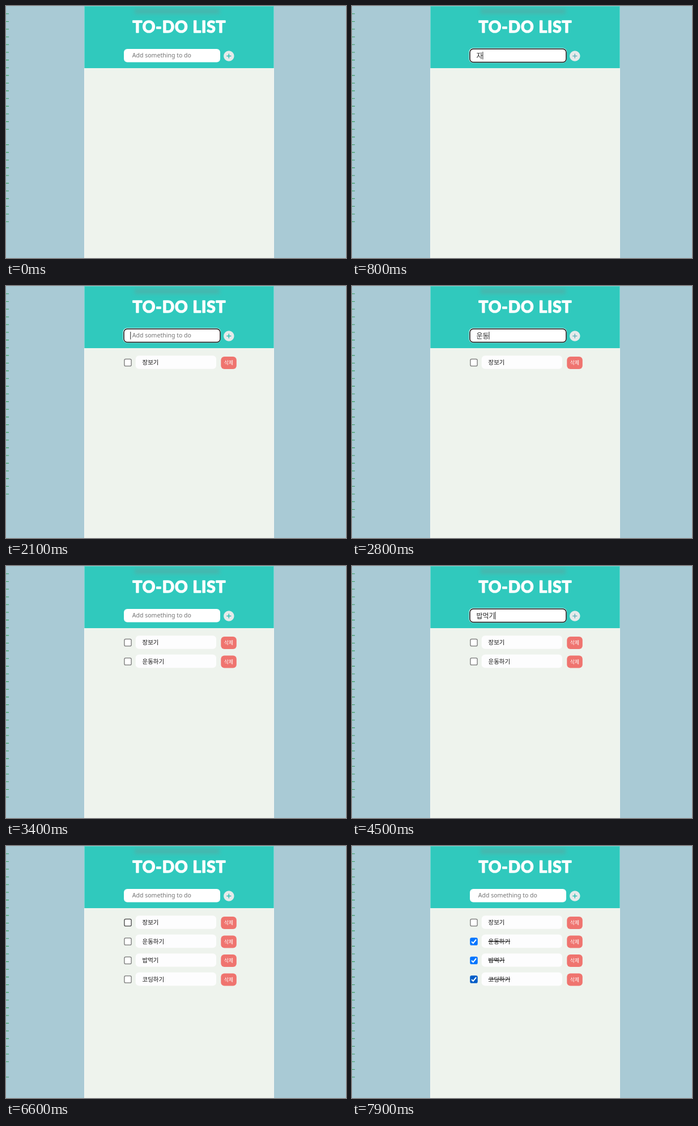
Recreate the animation shown at these times as an HTML page. Size 600 by 446 pixels, loop 8 s.

```html
<!DOCTYPE html>
<html lang="ko">
<head>
<meta charset="utf-8">
<style>
  html, body { margin: 0; width: 100%; height: 100%; overflow: hidden; background: #a9cad5; }
  svg { display: block; width: 100%; height: 100%; }
  text { font-family: "Noto Sans CJK KR", "Noto Sans CJK", "Noto Sans CJK JP", sans-serif; white-space: pre; }
  .title { font: 700 28px Lato, sans-serif; letter-spacing: 1px; fill: #fff; stroke: #fff; stroke-width: 1.6; stroke-linejoin: round; }
  .hint { font: 10.55px "Noto Sans", sans-serif; fill: #757575; }
  .typed { font-size: 12px; font-weight: 300; fill: #222; }
  .label { font-size: 10.5px; font-weight: 500; fill: #111; }
  .done .label { text-decoration: line-through; }
  .delete { font-size: 8.7px; fill: #fff; }
  .box { fill: #fff; stroke: #767676; stroke-width: 1.3; }
  .hover .box { stroke: #444; }
  .done .box { fill: #0075ff; stroke: #0075ff; }
  .done.hover .box { fill: #005cc8; stroke: #005cc8; }
  .tick { fill: none; stroke: #fff; stroke-width: 2; visibility: hidden; }
  .done .tick { visibility: visible; }
</style>
</head>
<body>
<svg viewBox="0 0 600 446">
  <defs><filter id="blur" x="-20%" y="-80%" width="140%" height="260%"><feGaussianBlur stdDeviation="3"/></filter></defs>
  <path id="marks" stroke="#3aa060" stroke-width="1.1"/>
  <rect x="138" width="335" height="446" fill="#eef3ed"/>
  <rect x="138" width="335" height="110" fill="#30c9bd"/>
  <path d="M138.5 446V.5H472.5V446" fill="none" stroke="#fff" stroke-opacity=".3"/>
  <rect x="227" y="5" width="150" height="9" fill="#4fb0a8" opacity=".75" filter="url(#blur)"/>
  <text class="title" x="223.5" y="47">TO-DO LIST</text>
  <rect id="halo" x="206.5" y="74.5" width="172.5" height="26" rx="7" fill="#fff"/>
  <rect id="field" x="208" y="76" width="170" height="23.5" rx="6" fill="#fff" stroke="#111"/>
  <text id="hint" class="hint" x="222.7" y="90.7">Add something to do</text>
  <text id="typed" class="typed" x="219.5" y="92.5"></text>
  <rect id="caret" y="81" width="1" height="13.5" fill="#222"/>
  <circle cx="393.3" cy="88.5" r="9.3" fill="#e6eaea"/>
  <path id="plus" d="M389.3 88.5h8M393.3 84.5v8" stroke-width="1.4"/>
  <g id="rows"></g>
</svg>
<script>
const $ = id => document.getElementById(id);
const LOOP = 8000;

// [label, time added, time checked]
const items = [
  ['장보기', 1700, Infinity],
  ['운동하기', 3300, 6900],
  ['밥먹기', 4600, 7300],
  ['코딩하기', 6100, 7700]
];

// [focus time, first key time, input states]; a state lasts 100 ms
const sessions = [
  [300, 600, 'ㅈ 자 자 장 장ㅂ 장보 장복 장보기'],
  [1900, 2300, 'ㅇ 우 운 운ㄷ 운도 운동 운동하 운동학 운동하기'],
  [3600, 3900, 'ㅂ 바 밥 밥머 밥먹 밥먹기'],
  [4900, 5100, 'ㅋ 코 코디 코딩 코딩ㅎ 코딩하 코딩학 코딩하기']
];

// Margin marks: [start time, count, gaps]
const margins = [
  [0, 28, [16]], [500, 28, []], [1000, 32, []], [1900, 27, []],
  [2800, 30, []], [4700, 24, [3, 5, 6, 15, 19, 21]],
  [5500, 32, []], [6400, 30, [28]], [7300, 30, []]
];

$('rows').innerHTML = items.map(([label], i) => `
  <g transform="translate(0 ${i * 33.5})">
    <rect class="box" x="208.9" y="129.4" width="12.2" height="12.2" rx="2.2"/>
    <path class="tick" d="M211 135.8l2.8 2.8 5.3-6.6"/>
    <rect x="228.7" y="123.3" width="142.3" height="23.5" rx="6" fill="#fdfdfe"/>
    <text class="label" x="240.5" y="139.2">${label}</text>
    <rect x="379.3" y="125" width="27.5" height="22" rx="6" fill="#ef746f"/>
    <text class="delete" x="393" y="139.4" text-anchor="middle">삭제</text>
  </g>`).join('');
const rows = [...$('rows').children];

const show = (el, on) => el.setAttribute('visibility', on ? 'visible' : 'hidden');

function drawMarks(t) {
  const [, count, gaps] = margins.findLast(m => m[0] <= t);
  let d = '';
  for (let k = 0; k < count; k++)
    if (!gaps.includes(k)) d += `M0 ${13.8 + k * 13.63}h5`;
  $('marks').setAttribute('d', d);
}

function drawInput(t) {
  const n = sessions.findIndex(([focus], i) => t >= focus && t < items[i][1]);
  const focused = n >= 0;
  let text = '', idle = 0;
  if (focused) {
    const [focus, start, list] = sessions[n];
    const states = list.split(' ');
    const step = Math.min(Math.floor((t - start) / 100), states.length - 1);
    text = step < 0 ? '' : states[step];
    idle = t - (step < 0 ? focus : start + step * 100);
  }
  $('typed').textContent = text;
  show($('hint'), !text);
  show($('halo'), focused);
  $('field').setAttribute('stroke-width', focused ? 1.5 : 0);
  show($('caret'), focused && idle % 1000 < 500);
  $('caret').setAttribute('x', 219.3 + (text ? $('typed').getComputedTextLength() : 0));
  $('plus').setAttribute('stroke', text ? '#62b3bb' : '#25bfb3');
}

function drawRows(t) {
  const hovered = t < 6400 ? -1 : Math.min(3, Math.floor((t - 6400) / 400));
  rows.forEach((row, i) => {
    const [, added, checked] = items[i];
    row.style.display = t >= added ? '' : 'none';
    row.classList.toggle('done', t >= checked);
    row.classList.toggle('hover', i === hovered);
  });
}

function frame(now) {
  const t = now % LOOP;
  drawMarks(t);
  drawInput(t);
  drawRows(t);
  requestAnimationFrame(frame);
}
frame(0);
</script>
</body>
</html>
```
